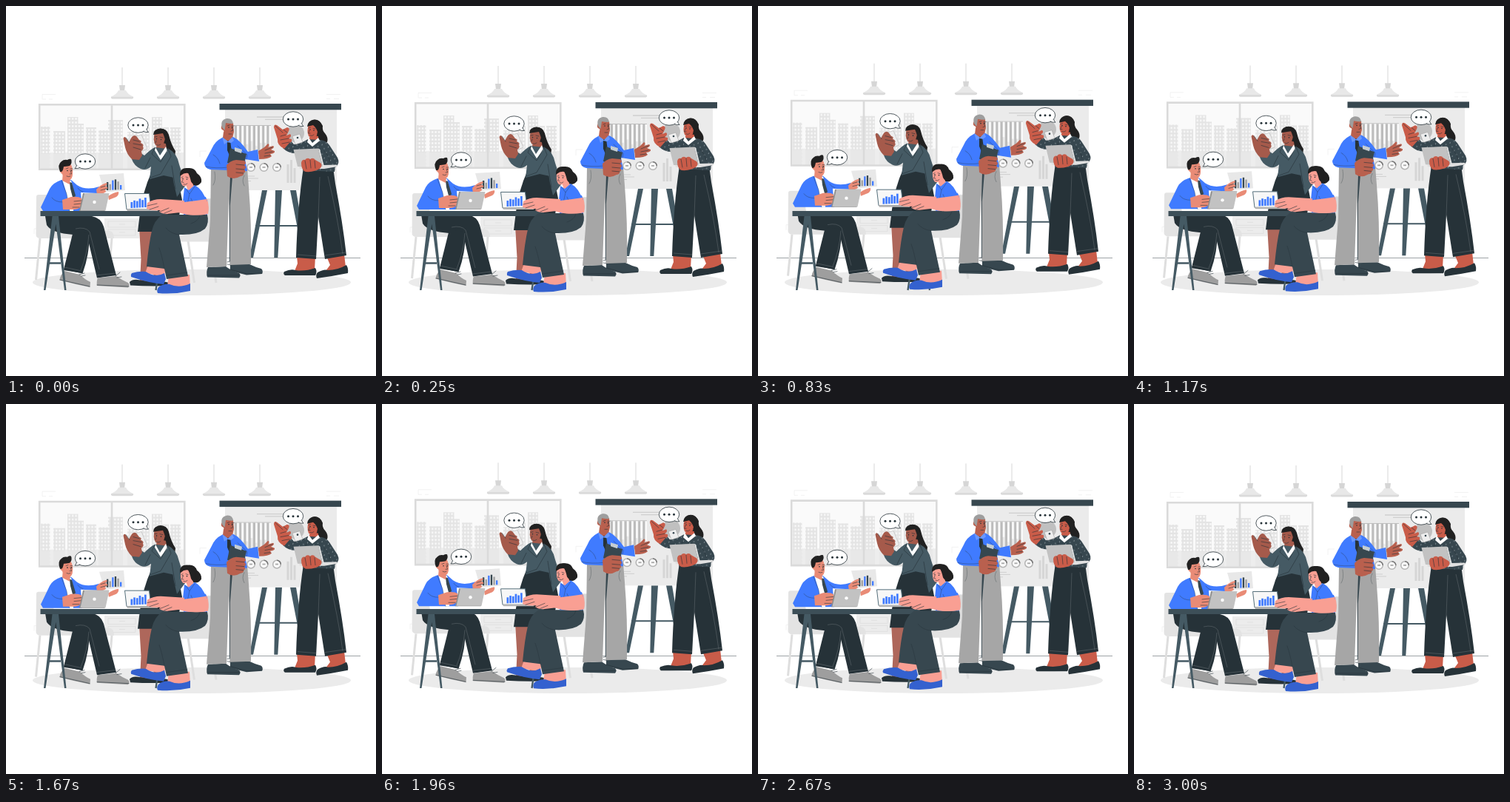
An HTML page for the animation above (3.04 s loop, 500 by 500 pixels).

```html
<!DOCTYPE html>
<html lang="en">
<head>
<meta charset="utf-8">
<title>Office meeting</title>
<style>
html, body { margin: 0; width: 100%; height: 100%; overflow: hidden; background: #fff; }
svg { display: block; width: 100vw; height: 100vh; }
.ln { fill: none; stroke: #263238; stroke-width: .6; stroke-linecap: round; stroke-linejoin: round; }
.thin { fill: none; stroke: #fff; stroke-width: .5; opacity: .3; }
.blue { fill: #407bff; } .navy { fill: #3461cf; }
.dark { fill: #263238; } .slate { fill: #37474f; } .steel { fill: #455a64; }
.peach { fill: #e98b76; } .pink { fill: #f99f93; } .brown { fill: #a55a4b; }
.tan { fill: #b9604e; } .rust { fill: #c95c49; }
.white { fill: #fff; } .grey { fill: #a6a6a6; }
</style>
</head>
<body>
<svg viewBox="0 0 500 500">
<defs>
  <pattern id="panes" width="4.4" height="5" patternUnits="userSpaceOnUse">
    <rect width="4.4" height="5" fill="#e4e4e4"/><rect x="1" y="1.2" width="2.3" height="2.5" fill="#fafafa"/>
  </pattern>
  <pattern id="dots" width="9" height="8" patternUnits="userSpaceOnUse" patternTransform="rotate(20)">
    <rect width="9" height="8" fill="#37474f"/>
    <circle cx="2" cy="2" r=".55" fill="#dfe6ea"/><circle cx="6.5" cy="6" r=".55" fill="#dfe6ea"/>
  </pattern>
</defs>

<ellipse cx="251" cy="373.5" rx="215" ry="17.5" fill="#ebebeb"/>
<path d="M25 340.5H479" stroke="#263238" stroke-width=".45"/>

<g class="float">
  <g id="lamps"></g>
  <path d="M67 119.500H49V126H54M58 126H63M433 119.500H452M433 125.500H438M443 125.500H450M271 196H262V204M45 301H38V308" fill="none" stroke="#efefef" stroke-width=".8"/>

  <!-- window -->
  <rect x="45" y="133" width="196.500" height="88" fill="#fafafa"/>
  <g id="city"></g>
  <path d="M45.200 133.300H241.300V220.800H45.200ZM143 133V221" fill="none" stroke="#dadada" stroke-width="2.600"/>

  <!-- board -->
  <path d="M337 297H398" stroke="#455a64" stroke-width="2"/>
  <path class="steel" d="M346 249H353L334 340H329ZM364 249H373L367.300 340H362.300ZM384 249H392L406 332H400Z"/>
  <rect x="296" y="139" width="151" height="110" fill="#ebebeb"/>
  <rect class="slate" x="288.500" y="132" width="164.500" height="8.300"/>
  <path d="M339 150H375M350 153.300H375" stroke="#cfcfcf" stroke-width="1.300"/>
  <g id="chart"></g>
  <g id="rings"></g>
  <path d="M318 230H336M318 233H341M318 236.500H331" stroke="#cfcfcf"/>
  <path d="M381 239V214M385.500 239V208M390 239V219" stroke="#d6d6d6" stroke-width="3"/>
  <circle cx="391" cy="172" r="12" fill="#c0c0c0"/>

  <!-- cabinet and chairs -->
  <path d="M133 287H180V314H133Z" fill="#ececec"/>
  <path d="M138 291H175V299H138ZM138 302H175V310H138ZM153 295H161M153 306H161" fill="none" stroke="#dcdcdc" stroke-width=".7"/>
  <path d="M46 314L40.500 370M143 314L140 352M246 317L254.500 374M275 317L284 374" fill="none" stroke="#dedede" stroke-width="3"/>
  <path d="M41 258Q41 255 44 255H58Q61 256 62 261L68 304H140Q146 305 146 314H47Q40 314 40.500 308Z" fill="#e3e3e3"/>
  <path d="M262 260H278Q282 260 282 264V312Q282 318.500 276 318.500H236Q231 318 231 311L262 305Z" fill="#e3e3e3"/>
  <path d="M272 261H278Q281.500 261 281.500 265V312Q281 318 276 318Z" fill="#d9d9d9"/>

  <!-- standing woman, left -->
  <path fill="#ae675b" d="M180 300H198L193 340L190 372H181L182.500 342Z"/>
  <path fill="#ae675b" d="M202 300H215L208 374H199Z"/>
  <path class="dark" d="M167 373Q171 369 178 370L192 372L203 373Q214 371 223 375V378Q195 379 168 377.500Z"/>
  <path class="dark" d="M196 226H231L238 262L230 305H178L181 280Q185 250 196 226Z"/>
  <path d="M205 166Q217 164 220 174Q223 187 229 196Q228 204 227 211Q216 207 210 196Z" fill="#212121"/>
  <path class="brown" d="M206 184L216 186L217 194L209 203L202 193Z"/>
  <path class="steel" d="M201 191Q195 194 187 202L181 198L170 207Q173 216 182 220Q189 223 196 217L194 234L213 229L232 233L232 213L219 193Z"/>
  <path class="steel" d="M218 192Q231 198 234 214L243 242L231 258Q226 240 224 222Z"/>
  <path class="white" d="M202 191L208 202L216 190L218 196L209 208L201 195Z"/>
  <path d="M201 192L197 200L209 211L219 193L223 203L209 227L195 232" class="ln"/>
  <path class="ln" d="M195 205L188 219M224 216L229 247"/>
  <path class="brown" d="M201 171Q198 182 202 188Q207 192 213 186L217 173Q210 167 201 171Z"/>
  <path d="M199 174Q199 166 209 165.500Q220 166 219 184L216 187Q215 178 212 172Q205 173 199 174Z" fill="#212121"/>
  <path class="ln" d="M201 177L204 176.500M208 177L212 178M203 182L202 185M204 188Q207 189 209 187"/>
  <circle class="dark" cx="203.500" cy="179.500" r=".8"/><circle class="dark" cx="209.500" cy="180.500" r=".8"/>
  <path d="M176 176L183 174L191 193L184 196Z" fill="#eee" stroke="#aaa" stroke-width=".5"/>
  <path class="brown" d="M180 208L170 207Q163 200 161 191L158.500 179Q160 175 162.500 179L166 184L170 177Q174 173 177 177L180 181Q184 182 182 185Q187 187 185 190Q187 193 183 196L184 202Z"/>
  <path class="ln" d="M172 181L180 183M172 186L183 188M172 191L182 194M162 178L167 185"/>

  <!-- seated man -->
  <path class="dark" d="M53 284H116Q128 286 132 298L149 364L123 367.500L110 312L103 361L78 357Q86 333 91 309Q62 307 55 296Z"/>
  <path class="dark" d="M91 304L113 307Q113 335 103.500 361.500L78 356Z"/>
  <path class="thin" d="M94 301Q107 298 113 305L126 356M112 309Q110 335 101 357M79 353L102 358M122 364L148 361"/>
  <path d="M79 358L100 363Q107 370 114 373L113.500 380Q93 376 72.500 370.500Q73 364 79 358Z" fill="#9e9e9e"/>
  <path d="M124 367.500L149 365Q156 370 165 374Q168 377 165 380.500L123 378Q122 372 124 367.500Z" fill="#9e9e9e"/>
  <path class="ln" d="M73 370L113 379M123 377L166 379M99 363L106 361M102 365L107 364M148 365L154 360M150 367L156 366"/>
  <path class="blue" d="M75 235Q63 239 59 247L47 272L50 277H103L101 252L124 253L126 244Q108 250 96 242L88 235Z"/>
  <path class="white" d="M76 234L88 236L92 252L91 277H86L82 254Z"/>
  <path class="slate" d="M86 238L89 239L94 256L91 262L87 247Z"/>
  <path class="ln" d="M75 236L82 254L86 277M62 259Q66 265 77 265M97 246Q99 250 104 251" stroke-opacity=".6"/>
  <path class="peach" d="M77 225L87 233L86 241L76 236Z"/>
  <path class="peach" d="M76 216Q79 211 87 213Q91 219 90 227Q90 234 85 235Q78 234 76 227Q72 225 73 220Q75 218 76 221Z"/>
  <path d="M73 224Q69 214 75 210Q78 207 83 208Q86 206 88 207Q90 212 86 216Q80 217 78 217Q77 223 75 224Z" fill="#212121"/>
  <path class="ln" d="M81 220L84 219M87 220L89.500 220M87 222L88.500 227L86 227M82 230Q85 231.500 87 230"/>
  <circle class="dark" cx="83" cy="222.500" r=".8"/><circle class="dark" cx="88.500" cy="222.500" r=".8"/>
  <path class="peach" d="M138 257Q145 252 152 251Q153 255 149 258L139 262Z"/>
  <path d="M126 228L159 226L161 249L133 252Z" fill="#e8e8e8"/>
  <g id="sheet"></g>
  <path class="peach" d="M122 248Q128 241 136 239Q138 241 134 243L137 245Q138 247 134 248L135 251Q131 254 123 255Z"/>
  <path class="peach" d="M76 262L88 258Q98 257 102 260L103 268Q101 274 93 275L77 275Z"/>
  <path class="ln" d="M92 264L102 263M92 268L102 267M90 272L99 272M128 245L135 243M128 249L136 247"/>
  <path d="M104 253H139L133.500 277H99Z" fill="#8c8c8c"/>
  <path d="M106 253H139.500L134.500 276.500H100.500Z" fill="#c2c2c2"/>
  <circle class="white" cx="119.500" cy="265" r="2.200"/>

  <!-- standing man -->
  <path class="slate" d="M273 353L297 352Q305 358 315 361Q318 364 315 367.500L272 366.500Q270 359 273 353Z"/>
  <path class="slate" d="M303 349L329 349Q337 353 345 355Q348 358 346 362L325 363.500L303 358Z"/>
  <path class="ln" d="M272 364H316M303 356L326 362L346 361M299 346L303 345V350L299 349"/>
  <path class="grey" d="M277 219H326L328 245Q332 292 331 349L303 350L301 260L298 352L271 353L276 290Z"/>
  <path class="slate" d="M303 230H306L302.800 270V345H301.800L302 262Z"/>
  <path class="ln" d="M282 224Q284 236 280 242M322 229Q318 236 322 243" stroke-opacity=".5"/>
  <path class="blue" d="M292 178Q282 183 278 193L268 212Q268 219 276 221L326 223L323 207L342 210L340 194L327 197Q316 181 307 177Z"/>
  <path class="ln" d="M280 201Q287 205 289 213M313 189L326 201L325 207M270 217Q283 220 300 218" stroke-opacity=".6"/>
  <path class="tan" d="M294 170L307 173L306 180L301 184L293 178Z"/>
  <path class="dark" d="M299 182L303 182L305 197L302 202L299 195Z"/>
  <path d="M292 177L300 183L306 177L308 182L304 185L299 184L295 187Z" fill="#6a98ff"/>
  <path class="tan" d="M293 158Q299 154 307 158L308 170Q307 178 301 178Q295 176 294 168Q290 167 291 163Z"/>
  <path d="M292 164Q289 154 298 152Q306 151 307 159Q301 159 297 158L295.500 168Z" fill="#9e9e9e"/>
  <path class="ln" d="M299 162L302 161M305 162L308 162M305 164L307 168L304 169M301 173H305"/>
  <circle class="dark" cx="301" cy="164" r=".8"/><circle class="dark" cx="306" cy="164" r=".8"/>
  <path class="slate" d="M303 192L325 200L321 217L299 212Z"/>
  <path d="M309 191L319 194L318 199L309 196Z" fill="#c5cdd1"/>
  <path class="tan" d="M298 215Q303 209 311 208L322 209Q326 212 322 215Q326 218 322 221Q325 224 321 226Q322 229 317 230Q307 236 299 230Z"/>
  <path class="ln" d="M311 214L322 215M311 220L322 221M311 225L321 226"/>
  <path class="tan" d="M341 196L349 191L354 186Q357 187 354 191L361 189Q364 191 358 194L363 196Q364 199 357 200L359 203Q355 207 342 207Z"/>
  <path class="ln" d="M350 195L360 191M350 199L360 197M349 203L357 202"/>

  <!-- standing woman, right -->
  <path class="rust" d="M393 338H418L417 357Q404 362 390 358L394 348Z"/>
  <path class="rust" d="M433 338L457 335L459 353Q445 361 432 358L438 350Z"/>
  <path class="dark" d="M376 359Q385 355 391 357Q404 359 418 354Q421 359 418 364H377Q374 362 376 359Z"/>
  <path class="dark" d="M421 360Q430 355 435 357Q448 357 460 350Q463 355 462 361Q442 365 420 368Q418 363 421 360Z"/>
  <path class="dark" d="M402 218H442L445 240Q455 293 460 337L431 342L422 285L419 342L392 340Q394 270 402 218Z"/>
  <path class="thin" d="M424 231Q423 260 422 286M435 230Q449 290 455 335M394 336L419 338M431 337L459 333"/>
  <path d="M414 154Q424 152 428 162Q427 168 431 172Q436 178 434 184Q427 187 418 183Z" fill="#212121"/>
  <path class="rust" d="M412 174L422 176L422 185L414 189L408 182Z"/>
  <path d="M408 180Q398 186 389 187L384 181L374 192Q382 200 394 199L403 197L401 222L444 224L445 218Q452 213 448 205L437 188Q432 181 424 181Z" fill="url(#dots)"/>
  <path class="white" d="M409 178L414 185L422 178L424 182L414 190L407 184Z"/>
  <path class="ln" d="M430 196Q437 203 438 211M403 199L406 190"/>
  <path class="rust" d="M409 160Q406 169 409 176Q414 180 420 175L423 160Q416 156 409 160Z"/>
  <path d="M407 163Q408 154 417 153.500Q427 154 427 168L425 179Q420 176 421 170Q419 164 415 161Z" fill="#212121"/>
  <path class="ln" d="M409 165L411.500 164M415 165.500L418 166M410 168L408.500 172L411 172M411 175Q414 176.500 416 174"/>
  <circle class="dark" cx="411" cy="167" r=".8"/><circle class="dark" cx="416" cy="168" r=".8"/>
  <path d="M387 176L397 173L401 184L391 187Z" fill="#eee" stroke="#999" stroke-width=".5"/>
  <circle class="slate" cx="394" cy="178" r="1.300"/>
  <path class="rust" d="M376 193Q366 188 367 180L362 164Q362 159 366 161L374 167L380 164Q384 165 382 169L379 175L384 173Q387 176 382 179L386 180Q387 184 383 185Z"/>
  <path class="ln" d="M364 162L374 171M371 176L378 174M371 181L382 179M373 186L383 184M375 167L380 171"/>
  <path d="M396 216L447 214.500L448 217L430 220L397 220Z" fill="#e0e0e0"/>
  <path d="M388.500 194L422 192.500L428 217H394Z" fill="#c2c2c2"/>
  <path d="M422 192.500L424 193.500L430 217H428Z" fill="#e6e6e6"/>
  <path class="rust" d="M399 212Q400 207 404 208Q407 204 411 207Q415 204 418 208L425 212Q428 215 425 219Q417 225 405 224Q399 222 399 212Z"/>
  <path class="ln" d="M404 209L406 220M411 208L412 219M417 209L418 219"/>
</g>

<!-- table -->
<path class="steel" d="M62.500 284H69L53.500 384H51ZM66 284H71L81.500 384H79Z"/>
<path d="M57 347.500H74M217 284L202.500 384M217 286L232 384" stroke="#455a64" stroke-width="2.300" fill="none"/>
<rect x="46.500" y="277" width="172" height="7" fill="#3d4f58"/>

<g class="float">
  <!-- laptop and seated woman -->
  <path d="M160.500 253.500H193.500L196 275H163Z" fill="#f7f7f7" stroke="#546e7a" stroke-width="1"/>
  <g id="screen"></g>
  <path d="M163 274.500H205V277H164Z" fill="#b5b5b5"/>
  <path class="pink" d="M192 350H216L214 366Q202 363 188 361Z"/>
  <path class="pink" d="M220 364L248 363L249 380Q235 381 218 379Z"/>
  <path class="navy" d="M170 361Q180 358 189 359Q202 368 214 361L216 369L213 376Q192 374 169 366Q168 363 170 361Z"/>
  <path class="navy" d="M206 380Q213 375 221 376Q234 382 249 375L249 385Q227 390 205 388Q203 384 206 380Z"/>
  <path class="slate" d="M211 282H272Q275 293 269 301Q258 310 234 309L246 365L217 369L214 355L190 352Q193 321 197 304Q200 290 211 282Z"/>
  <path class="ln" d="M234 309Q223 308 216 300M262 283Q260 291 250 294M217 364L245 360M214 355Q211 338 207 327" stroke-opacity=".7"/>
  <path d="M235 228Q235 218 246 219Q255 218 258 226Q265 231 264 238Q259 245 252 242Z" fill="#212121"/>
  <path class="pink" d="M242 238L252 237L254 247L246 250Z"/>
  <path class="blue" d="M241 245L239 264L240 282H272L271 264Q266 248 255 242L247 249Z"/>
  <path class="ln" d="M243 247L248 254L255 244M250 260L253 267M248 254L245 268" stroke-opacity=".6"/>
  <path class="pink" d="M236 229Q235 239 239 243Q245 245 250 238L252 228Q243 223 236 229Z"/>
  <path d="M235 230Q235 220 246 219Q257 221 256 234L259 242Q252 242 250 237Q248 228 245 224Q240 225 235 230Z" fill="#212121"/>
  <path class="ln" d="M237 232L239 231M243 231L246 232M239 235L237.500 238L240 238.500M240 241Q243 242 245 240"/>
  <circle class="dark" cx="239" cy="233.500" r=".8"/><circle class="dark" cx="244.500" cy="234" r=".8"/>
  <path class="pink" d="M191 266Q199 261 209 261L241 263V271L214 275Q200 278 190 274Z"/>
  <path class="pink" d="M258 261L272 261Q275 272 273 281Q255 285 235 279L218 281Q211 281 207 278L214 268Q224 262 235 267L258 268Z"/>
  <path class="blue" d="M256 256L270 258L272 264L257 266Z"/>
  <path class="pink" d="M233 266L257 263L271 261Q275 275 272 281Q250 285 233 279Z"/>
  <path class="ln" d="M191 270L204 267M194 275L206 271M208 278L220 273M214 280L224 276"/>
</g>

<g class="float" id="bubbles"></g>
</svg>

<script>
const NS = "http://www.w3.org/2000/svg";
const LOOP = 3040, PERIOD = 1500, RISE = 6;

function add(id, tag, attrs) {
  const el = document.createElementNS(NS, tag);
  for (const key in attrs) el.setAttribute(key, attrs[key]);
  document.getElementById(id).append(el);
}
const bar = (id, x, y, width, height, fill) => add(id, "rect", { x, y, width, height, fill });
const shape = (id, d, fill, more) => add(id, "path", { d, fill, ...more });

for (const x of [157, 219, 281, 343]) {
  bar("lamps", x - .6, 83, 1.2, 25, "#dedede");
  shape("lamps", `M${x - 4} 107h8l-1 8h-6z`, "#d6d6d6");
  shape("lamps", `M${x - 5} 114h10q2 5 10 8.500v1.500h-30v-1.500q8-3.500 10-8.500z`, "#e8e8e8");
  shape("lamps", `M${x - 15} 122.700h30q1 2.800-3 2.800h-24q-4 0-3-2.800z`, "#dadada");
}

// skyline: x, top, width
const towers = [[47, 163, 12.5], [64, 169, 16], [83, 150, 14.5], [97, 159, 8], [108, 164, 14],
  [125, 168, 15], [138, 154, 20], [164, 170, 14], [182, 164, 12], [197, 150, 14], [211, 164, 9], [222, 164, 14]];
bar("city", 47, 198, 193, 22, "#ededed");
for (const [x, y, w] of towers) {
  bar("city", x, y, w, 220 - y, "url(#panes)");
  bar("city", x, 200, w, 20, "#e8e8e8");
}

bar("chart", 308, 161, 50, 1, "#bdbdbd");
for (let i = 0; i < 8; i++) {
  const x = 309 + i * 6.2;
  bar("chart", x, 162, 3.2, 38, "#bcbcbc");
  bar("chart", x + 3.2, 162, 2.4, 18 + 9 * Math.abs(Math.sin(i * 2)), "#fafafa");
}

for (const x of [331, 348.5, 366]) {
  add("rings", "circle", { cx: x, cy: 218, r: 5.3, fill: "#fafafa", stroke: "#b5b5b5", "stroke-width": 1.5 });
  shape("rings", `M${x} 212.700a5.300 5.300 0 0 1 5.300 5.300`, "none", { stroke: "#777", "stroke-width": 1.5 });
  bar("rings", x - 2, 217, 4, 1.8, "#aaa");
}

function bars(id, x, base, heights, step, width, colors) {
  heights.forEach((h, i) => bar(id, x + i * step, base - h - i * .2, width, h, colors[i % colors.length]));
}
bars("sheet", 136, 249, [11, 8, 13, 14, 11, 6], 3.6, 2.3, ["#37474f", "#9e9e9e", "#407bff"]);
bars("screen", 168.5, 273, [8, 10, 9, 12, 10, 13], 3.7, 2.7, ["#407bff"]);

// speech bubbles: centre and side of the tail
for (const [x, y, side] of [[178.5, 161, 1], [107, 210, -1], [388, 153, 1]]) {
  const p = (dx, dy) => `${x + dx * side} ${y + dy}`;
  const ink = { stroke: "#263238", "stroke-width": .8 };
  add("bubbles", "ellipse", { cx: x, cy: y, rx: 13.7, ry: 10.2, fill: "#fff", ...ink });
  shape("bubbles", `M${p(11.5, 5)}Q${p(12, 8)} ${p(14, 9.5)}Q${p(10, 10)} ${p(7, 8.4)}`, "#fff", ink);
  for (const dx of [-6.5, 0, 6.5]) add("bubbles", "circle", { cx: x + dx, cy: y, r: 1.5, fill: "#263238" });
}

const floats = document.querySelectorAll(".float");
const start = performance.now();
function draw(now) {
  const phase = Math.max(0, now - start) % LOOP % PERIOD / PERIOD;
  const y = -RISE * (1 - Math.abs(1 - 2 * phase));
  for (const g of floats) g.setAttribute("transform", `translate(0 ${y.toFixed(2)})`);
  requestAnimationFrame(draw);
}
draw(start);
</script>
</body>
</html>
```
